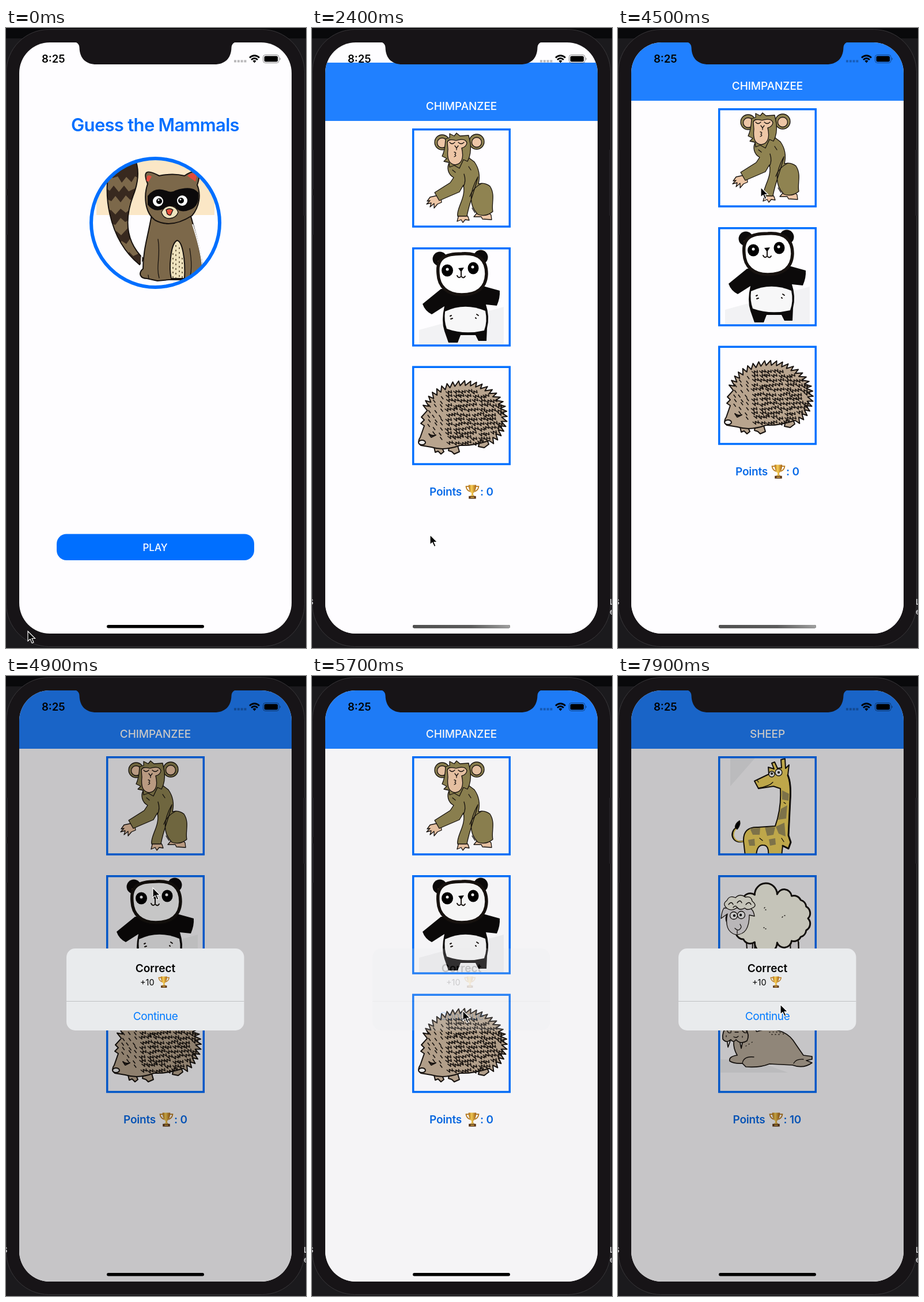
Recreate the animation shown at these times as an HTML page. Size 521 by 1074 pixels, loop 8000 ms.

```html
<!DOCTYPE html>
<html lang="en">
<head>
<meta charset="utf-8">
<title>Guess the Mammals</title>
<style>
html, body { margin: 0; width: 100%; height: 100%; overflow: hidden; background: #1b1a1d; }
svg { display: block; width: 100%; height: 100%; }
text { font-family: Inter, Roboto, sans-serif; font-weight: 600; }
.mid { text-anchor: middle; }
.blue { fill: #006fff; }
.ink { stroke: #17120f; stroke-width: 2; stroke-linejoin: round; stroke-linecap: round; }
.line { fill: none; }
.fat { stroke-width: 3; }
.thin { stroke-width: 1.3; }
.points { font-size: 19px; letter-spacing: -.2px; fill: #0a6be8; }

.game, .dim, .alert, .first, .second, .faded, .desk { animation: 8s step-end infinite; }
.game { animation-name: present; }
.dim, .alert { animation-name: fade; }
.alert g { transform-origin: 259.5px 543px; animation: pop 8s step-end infinite; }
.first { animation-name: first; }
.second { animation-name: second; }
.faded { animation-name: faded; }
.desk { animation-name: desk; }
.cursor { animation: point 8s infinite; }

@keyframes present {
  0% { transform: translateY(1049px); }
  27.5% { transform: translateY(543px); }
  28.75% { transform: translateY(152px); }
  30% { transform: translateY(35px); }
  31.25% { transform: translateY(8px); }
  32.5% { transform: translateY(2px); }
  33.75%, 100% { transform: none; }
}
@keyframes fade {
  0% { opacity: 0; }
  58.75% { opacity: .5; }
  60% { opacity: .9; }
  61.25% { opacity: 1; }
  70% { opacity: .57; }
  71.25% { opacity: .17; }
  72.5% { opacity: .04; }
  73.75% { opacity: 0; }
  93.75% { opacity: .5; }
  95% { opacity: .9; }
  96.25%, 100% { opacity: 1; }
}
@keyframes pop {
  0%, 58.75%, 93.75% { transform: scale(1.08); }
  60%, 95% { transform: scale(1.015); }
  61.25%, 96.25%, 100% { transform: none; }
}
@keyframes first { 0% { opacity: 1; } 75%, 100% { opacity: 0; } }
@keyframes second { 0% { opacity: 0; } 75%, 100% { opacity: 1; } }
@keyframes faded { 0%, 57.5%, 100% { opacity: 0; } 28.75% { opacity: 1; } }
@keyframes desk { 0% { opacity: 0; } 27.5%, 100% { opacity: 1; } }
@keyframes point {
  0% { transform: translate(38px, 1045px); animation-timing-function: step-end; }
  2.5% { transform: translate(38px, 1045px); animation-timing-function: steps(7); }
  11.25% { transform: translate(137px, 896px); animation-timing-function: steps(7); }
  20%, 35% { transform: translate(205px, 878px); animation-timing-function: steps(16); }
  55%, 57.5% { transform: translate(248px, 276px); animation-timing-function: steps(3); }
  61.25% { transform: translate(255px, 367px); animation-timing-function: steps(5); }
  67.5%, 77.5% { transform: translate(262px, 580px); animation-timing-function: steps(10); }
  90%, 92.5% { transform: translate(277px, 492px); animation-timing-function: steps(5); }
  98.75%, 100% { transform: translate(282px, 569px); }
}
</style>
</head>
<body>
<svg viewBox="0 0 521 1074" preserveAspectRatio="none">
  <defs>
    <clipPath id="screen"><rect x="23" y="25" width="473" height="1024" rx="53"/></clipPath>
    <clipPath id="disc"><circle cx="259.5" cy="337.5" r="112"/></clipPath>
    <clipPath id="tail"><path d="M182 236C167 280 176 365 232 410L239 400C213 375 202 340 221 290C232 262 231 240 222 222H190Z"/></clipPath>
    <clipPath id="tile"><rect x="176" y="141" width="167" height="168"/></clipPath>
    <linearGradient id="bar"><stop stop-color="#505050"/><stop offset=".6" stop-color="#5c5c5c"/><stop offset="1" stop-color="#a0a0a0"/></linearGradient>
    <linearGradient id="gold"><stop stop-color="#b06c13"/><stop offset=".4" stop-color="#f7cf56"/><stop offset="1" stop-color="#a45f12"/></linearGradient>
    <symbol id="trophy" viewBox="0 0 24 24">
      <path d="M6 3H1.5Q2 9 8 11.500M18 3H22.500Q22 9 16 11.500" fill="none" stroke="#b97a1c" stroke-width="1.700"/>
      <path d="M5.500 .500H18.500Q18 12 13.500 14V17L16 19H8L10.500 17V14Q6 12 5.500 .500Z" fill="url(#gold)"/>
      <path d="M6 19H18V23.500H6Z" fill="#5b3517"/><path d="M9 20.500H15V22H9Z" fill="#e0b048"/>
    </symbol>
  </defs>

  <!-- phone body -->
  <path d="M0 0H521V18H0Z" fill="#09090b"/>
  <rect x=".5" y="2.500" width="518" height="1069" rx="74" fill="#171417" stroke="#39373a"/>
  <path d="M516 211H521V325H516ZM0 211H3V279H0ZM0 290H3V358H0Z" fill="#222024"/>
  <g class="desk" fill="#d5d5d7" font-size="13"><text x="-6" y="999">S</text><text x="517" y="999">L</text><text x="517" y="1016">e</text></g>

  <g clip-path="url(#screen)">
    <path d="M23 25H496V1049H23Z" fill="#fefdff"/>
    <text class="mid blue" x="259" y="179" font-size="31" letter-spacing="-.7">Guess the Mammals</text>

    <!-- raccoon -->
    <g clip-path="url(#disc)">
      <path d="M157 220H362V324H157Z" fill="#fbe7c6"/>
      <g clip-path="url(#tail)">
        <path d="M160 220H245V415H160Z" fill="#7c684a"/>
        <path d="M180 220H235V262L224 257L218 267L209 258L201 268L194 257L185 260ZM170 275L180 282L187 273L196 284L205 273L213 283L228 276V290L216 298L208 290L199 302L190 291L183 300L170 294ZM170 320L182 315L190 323L199 313L208 320L222 309V328L207 336L199 329L190 341L170 335ZM175 358L192 352L200 359L213 345L222 356L209 374L201 369L185 380ZM202 400L214 388L221 395L232 390L245 412H220Z" fill="#38291f"/>
      </g>
      <path class="ink line" d="M182 236C167 280 176 365 232 410L239 400C213 375 202 340 221 290C232 262 231 240 222 222"/>
      <path class="ink" fill="#7c684a" d="M253 323C247 360 238 383 238 417C229 425 233 434 245 434L263 438L283 436H311L344 430C339 390 331 362 321 326Z"/>
      <path class="line" stroke="#fff" stroke-width="2" d="M249 331C243 363 234 385 235 413M324 340Q338 383 341 412"/>
      <path class="ink" fill="#eee2bd" d="M297 368C285 374 283 418 287 434H310C312 400 306 369 297 368Z"/>
      <path class="line" stroke="#75684d" stroke-width="2" stroke-dasharray="3 5" d="M295 376V433M301 380V433M290 390V433M306 398V433"/>
      <path class="ink line thin" d="M264 366C269 395 260 412 266 433M319 382Q324 412 320 430M247 428L248 434"/>
      <path class="ink" fill="#7c684a" d="M246 270C237 248 244 244 266 256Q290 251 310 256C332 241 340 250 332 272C339 288 336 310 323 325Q287 348 259 333C239 318 240 287 246 270Z"/>
      <path d="M244 265Q243 251 253 257L248 266ZM315 256Q327 246 331 257L329 266Z" fill="#e34c3c"/>
      <path d="M246 291Q258 274 279 282Q287 286 295 281Q323 272 334 285Q337 309 319 315Q302 322 294 310Q284 306 275 313Q257 321 246 306Z" fill="#0c0a0b"/>
      <g fill="#fff"><circle cx="264" cy="300" r="9"/><circle cx="306" cy="299" r="9"/></g>
      <circle cx="266" cy="300" r="5"/><circle cx="304" cy="299" r="5"/>
      <g fill="#fff"><circle cx="265" cy="298" r="1.500"/><circle cx="303" cy="297" r="1.500"/></g>
      <path class="ink thin" fill="#eee2bd" d="M270 319Q275 309 284 308Q296 309 299 319Q296 329 284 330Q273 330 270 319Z"/>
      <path class="ink thin" fill="#e8503c" d="M278 315Q284 311 290 315L286 324Q283 325 280 322Z"/>
    </g>
    <circle cx="259.5" cy="337.5" r="111.500" fill="none" stroke="#006fff" stroke-width="6"/>
    <rect class="blue" x="88" y="876.5" width="343" height="45.500" rx="17"/>
    <text class="mid" x="259" y="906" font-size="17" fill="#fff" style="font-weight:500">PLAY</text>

    <g class="game">
      <path d="M23 25H496V1100H23Z" fill="#fefdff"/>
      <path d="M23 25H496V126H23Z" fill="#2080ff"/>

      <g class="first">
        <text class="mid" x="259.500" y="107" font-size="19" letter-spacing="-.1" fill="#fff" style="font-weight:500">CHIMPANZEE</text>

        <!-- chimpanzee -->
        <g class="ink thin">
          <g fill="#8f8351"><circle cx="226" cy="163" r="13"/><circle cx="286" cy="162" r="13"/></g>
          <g fill="#edc6a6"><circle cx="226" cy="164" r="8.500"/><circle cx="286" cy="163" r="8.500"/></g>
          <path fill="#edc6a6" d="M223 254L205 258L200 265L205 264L199 270L207 268L205 275L212 269L212 277L218 270L225 267ZM255 288L252 300L259 297L262 302L266 297L273 298L271 292L267 287ZM288 284L281 292L294 292L296 296L312 297L311 289L306 284Z"/>
          <path fill="#8f8351" d="M240 196C232 207 237 219 246 224L240 233L213 250L221 264L256 249L263 237C268 259 250 278 253 291L269 291C273 267 284 243 288 223C273 250 272 272 288 288Q302 293 314 283C311 270 319 254 309 239Q300 232 289 235Q294 214 282 197L270 188Z"/>
          <path fill="#8f8351" d="M239 155L239 148L247 152L251 147L257 152L272 151L275 165Q277 184 270 196L263 193L256 208L247 203L239 206L238 198L229 196L234 191L226 187Q231 177 232 157Z"/>
          <path fill="#edc6a6" d="M235 163Q237 156 250 160Q266 155 269 164Q268 171 260 173Q266 199 249 202Q233 201 236 175Z"/>
          <path class="line" d="M239 163Q243 168 248 163M254 163Q259 168 264 163M248 169L251 173L254 169M251 173V176M247 180Q252 181 248 184Q252 186 247 188M264 218Q268 230 263 240M295 234Q279 242 274 257M278 277L283 285M244 211L249 215M272 205L276 211"/>
        </g>

        <!-- panda -->
        <path d="M186 513V488L333 448V513Z" fill="#f2f2f4"/>
        <g fill="#0c0a0a">
          <circle cx="222" cy="365" r="12.500"/><circle cx="293" cy="362" r="12.500"/>
          <path d="M224 417L192 443Q196 455 208 461L230 447Q224 472 230 490L237 510L253 510L258 497H284L289 507L303 507L304 485Q309 465 302 444L321 446Q327 432 326 420L297 412Z"/>
        </g>
        <path d="M218 369L224 366L223 372ZM289 363L295 367L290 369Z" fill="#d28462"/>
        <path class="ink" style="stroke-width:5.500" fill="#fefefe" d="M219 391C216 363 231 356 260 356C290 354 303 367 303 391C302 418 283 427 260 427C235 427 220 413 219 391Z"/>
        <path fill="#f7f7f8" d="M231 456Q265 440 301 455Q305 473 299 489Q265 497 234 486Q229 472 231 456Z"/>
        <ellipse cx="235" cy="385" rx="10" ry="10.500"/><ellipse cx="280" cy="381" rx="9.500" ry="10.500"/>
        <g fill="#fff"><circle cx="235" cy="383" r="2.500"/><circle cx="279" cy="379" r="2.500"/></g>
        <path d="M254 381L264 380L259 388Z"/>
        <path class="ink line" d="M259 387V394M252 394Q255 400 259 395Q263 400 266 395M240 464L242 463M241 469L244 468M286 461L289 463M284 467L285 468"/>

        <!-- hedgehog -->
        <path class="ink" fill="#b8a48e" d="M211 687L214 700L219 698L224 703L229 699L223 686ZM240 681L237 697L243 699L247 703L256 699L251 682ZM291 681L289 690L299 692L307 686L304 678Z"/>
        <path id="hedgehog" class="ink" fill="#b8a48e"/>
        <path id="quills" class="ink line" style="stroke-width:1.600"/>
        <path class="ink line" d="M203 668Q208 673 215 670L207 674Z"/>
        <ellipse class="ink" cx="191" cy="683" rx="6" ry="4" fill="#eee"/>

        <text class="points" x="204" y="774.500">Points</text>
        <use href="#trophy" x="266" y="756" width="25" height="25"/>
        <text class="points" x="292" y="774.500">: 0</text>
      </g>

      <g class="second">
        <text class="mid" x="259.500" y="107" font-size="19" letter-spacing="-.1" fill="#fff" style="font-weight:500">SHEEP</text>

        <!-- giraffe -->
        <g clip-path="url(#tile)">
          <path d="M195 141H239L195 191Z" fill="#f0f0f2"/>
          <path class="ink line fat" d="M219 286C198 292 192 270 207 262"/>
          <path class="ink line" style="stroke:#f4d75f" d="M219 286C200 290 196 272 206 264"/>
          <path class="ink" d="M204 263Q203 256 211 251Q213 258 207 265Z"/>
          <path class="ink" fill="#f4d75f" d="M271 161L267 151L272 149L277 160L284 159L283 145L290 143L291 160L297 154L295 172Q301 186 299 215L296 276L300 288L296 299L286 294L284 312H261Q263 293 252 293Q241 292 240 312H221L218 286Q217 261 243 262L273 260Q284 229 282 195L270 191L244 195L237 182L262 170L261 158Z"/>
          <path fill="#a1935e" d="M285 198L297 204L296 216L285 214ZM283 230L294 224L292 247L278 249ZM274 261L289 254L291 278L279 273ZM229 264L247 263L246 275L234 275ZM255 262L273 262L270 275L259 277ZM226 284L237 282L238 294L228 294ZM262 283L273 281L274 292L264 294Z"/>
          <path class="ink line thin" d="M288 219L291 221M246 281L251 285M284 281L288 287M242 181L244 184M244 194Q263 191 269 184"/>
          <path class="ink line fat" d="M295 172Q301 186 299 215L296 276L300 288L296 299L286 294"/>
          <g class="ink thin" fill="#fff"><circle cx="267" cy="170" r="5"/><circle cx="279" cy="167" r="6"/></g>
          <circle cx="267" cy="169" r="2"/><circle cx="279" cy="167" r="2"/>
        </g>

        <!-- sheep -->
        <g class="ink">
          <path fill="#f1eef0" d="M223 460L225 488H233L234 460ZM237 460L238 488H246L247 460ZM299 458L300 483H314L313 458Z"/>
          <path d="M225 483H233V488H225ZM238 483H246V488H238ZM300 480H314V484H300Z"/>
          <path id="fleece" class="fat" fill="#fdfbed"/>
          <path class="thin" fill="#edeaec" d="M192 402L184 402Q180 408 179 420L190 412Q184 442 204 448Q228 449 228 414L237 416Q235 402 225 401Z"/>
          <path class="thin" fill="#fdfbed" d="M190 403Q180 395 189 389Q194 379 204 384Q212 376 221 383Q232 381 233 390Q243 398 233 402Q225 407 220 402Q212 407 207 401Q198 408 190 403Z"/>
          <path class="line thin" d="M192 396Q197 389 200 396M207 393Q212 386 215 393M222 396Q228 389 231 396M200 401Q204 396 207 401M203 437Q210 444 214 435M207 441V446M212 430L214 434"/>
          <g class="thin" fill="#fff"><circle cx="201" cy="415" r="6.500"/><circle cx="214" cy="414" r="6.500"/></g>
          <path class="line thin" d="M254 402L255 401M256 405H257M285 418L286 417M289 415H290M253 436H254M256 438H257M314 461V476"/>
        </g>
        <circle cx="202" cy="415" r="2.200"/><circle cx="213" cy="414" r="2.200"/>

        <!-- walrus -->
        <path d="M178 687V664L240 667L295 687Z" fill="#f0f0f2"/>
        <g class="ink" style="stroke-width:1.700">
          <path fill="#b9ac9b" d="M190 604C198 589 223 588 234 606L241 616C266 607 291 614 304 631Q317 650 322 657L337 659V664L327 666L337 670Q322 681 303 674L263 672Q245 679 222 677L216 671Q202 672 194 667Q192 659 207 657Q200 645 201 633Z"/>
          <path fill="#fff" d="M189 629L191 643L195 632ZM211 630L214 645L217 631Z"/>
          <path fill="#b9ac9b" d="M190 605Q180 617 182 629Q188 637 196 630Q200 636 205 630Q213 639 224 632Q229 621 222 613Z"/>
          <path fill="#fff" class="thin" d="M188 605L195 599L198 603L191 608ZM216 600L223 598L230 604L222 607Z"/>
          <path class="line thin" d="M189 611Q190 620 196 618L197 610M215 611Q217 619 223 618L226 611M203 617H209M201 625Q205 628 209 624M236 660Q218 658 216 671M305 671Q309 663 322 664M188 623V625M216 624V626"/>
          <path class="line thin" stroke-dasharray="1 5" d="M263 617Q281 615 290 622M267 621H283M222 641L235 633"/>
        </g>

        <text class="points" x="199.500" y="774.500">Points</text>
        <use href="#trophy" x="262" y="756" width="25" height="25"/>
        <text class="points" x="287.500" y="774.500">: 10</text>
      </g>

      <path d="M175.700 140.700H343.300V309H175.700ZM175.700 346.700H343.300V515H175.700ZM175.700 552.300H343.300V720.500H175.700Z" fill="none" stroke="#006fff" stroke-width="3.500"/>
    </g>

    <path class="dim" d="M23 25H496V1049H23Z" fill="rgba(0,0,0,.22)"/>
    <g class="alert"><g>
      <rect x="105" y="472" width="308.500" height="142" rx="15" fill="#e9ebed"/>
      <path d="M105 563.500H413.500" stroke="#bfc0c2"/>
      <text class="mid" x="259.500" y="513" font-size="19">Correct</text>
      <text x="233" y="536" font-size="14.500" style="font-weight:400">+10</text>
      <use href="#trophy" x="264" y="520" width="20.500" height="20.500"/>
      <text class="mid" x="259.500" y="596" font-size="19" letter-spacing="-.4" fill="#007aff" style="font-weight:400">Continue</text>
    </g></g>

    <!-- status bar -->
    <path d="M118 24Q127 25 127.500 34C128 53 139 63 157 63H362C380 63 391 53 391.500 34Q392 25 401 24Z" fill="#171417"/>
    <text x="62" y="60" font-size="18.500">8:25</text>
    <path d="M396 57.500H418" stroke="#000" stroke-opacity=".27" stroke-width="4" stroke-dasharray="4 1.800"/>
    <g fill="none" stroke="#000" stroke-width="2.800"><path d="M423 51.500Q431.500 44 440 51.500M426 55Q431.500 50 437 55"/></g>
    <path d="M428.500 57Q431.500 54.500 434.500 57L431.500 60.500Z"/>
    <rect x="446.500" y="46.500" width="27.500" height="14" rx="4" fill="none" stroke="#000" stroke-opacity=".45"/>
    <rect x="448.500" y="48.500" width="23.500" height="10" rx="2.500"/>
    <path d="M475.500 51Q478 53.500 475.500 56Z" fill-opacity=".5"/>
    <rect x="175" y="1034" width="169" height="5.500" rx="2.700"/>
    <g class="faded"><rect x="175" y="1034" width="169" height="5.500" rx="2.700" fill="url(#bar)"/></g>
  </g>

  <path class="cursor" d="M0 0V17L4 13.500L7.300 20.500L10 19.200L7 12.500H12.500Z" stroke="#fff" stroke-width="1.200"/>
</svg>
<script>
const setPath = (id, d) => document.getElementById(id).setAttribute('d', d);
const at = (x, y) => x.toFixed(1) + ' ' + y.toFixed(1);

let seed = 7;
const random = () => (seed = seed * 16807 % 2147483647) / 2147483647;

// Spiky back, closed by a smooth belly and snout
const spikes = [];
for (let i = 0; i <= 54; i++) {
  const a = (-168 + i * 4) * Math.PI / 180;
  const lean = i % 2 ? .05 : 0;
  const r = i % 2 ? 1 : .87;
  spikes.push(at(264 + 75 * r * Math.cos(a + lean), 639 + 63 * r * Math.sin(a + lean)));
}
setPath('hedgehog', 'M' + spikes.join('L') + 'Q280 689 257 688Q230 698 207 691L189 688Q182 682 188 674L195 654L189 650L195 644L190 639Z');

// Zigzag quills over the back, short hairs on the face
let quills = '';
for (let y = 592; y < 685; y += 8) {
  for (let x = 198; x < 330; x += 11) {
    const px = x + random() * 5, py = y + random() * 4;
    if (((px - 260) / 66) ** 2 + ((py - 638) / 51) ** 2 > .95) continue;
    quills += 'M' + at(px, py) + (px < 229 ? 'l3 4' : 'l5 4l-1 -5l6 3l-1 -4');
  }
}
setPath('quills', quills);

// Woolly outline: arcs between points on a squarish oval
const squash = v => Math.sign(v) * Math.abs(v) ** .7;
const bumps = [];
for (let i = 0; i <= 17; i++) {
  const a = i / 17 * 2 * Math.PI;
  bumps.push(at(264 + 66 * squash(Math.cos(a)), 420 + 42 * squash(Math.sin(a))));
}
setPath('fleece', 'M' + bumps.join('A13 13 0 0 1 ') + 'Z');
</script>
</body>
</html>
```
